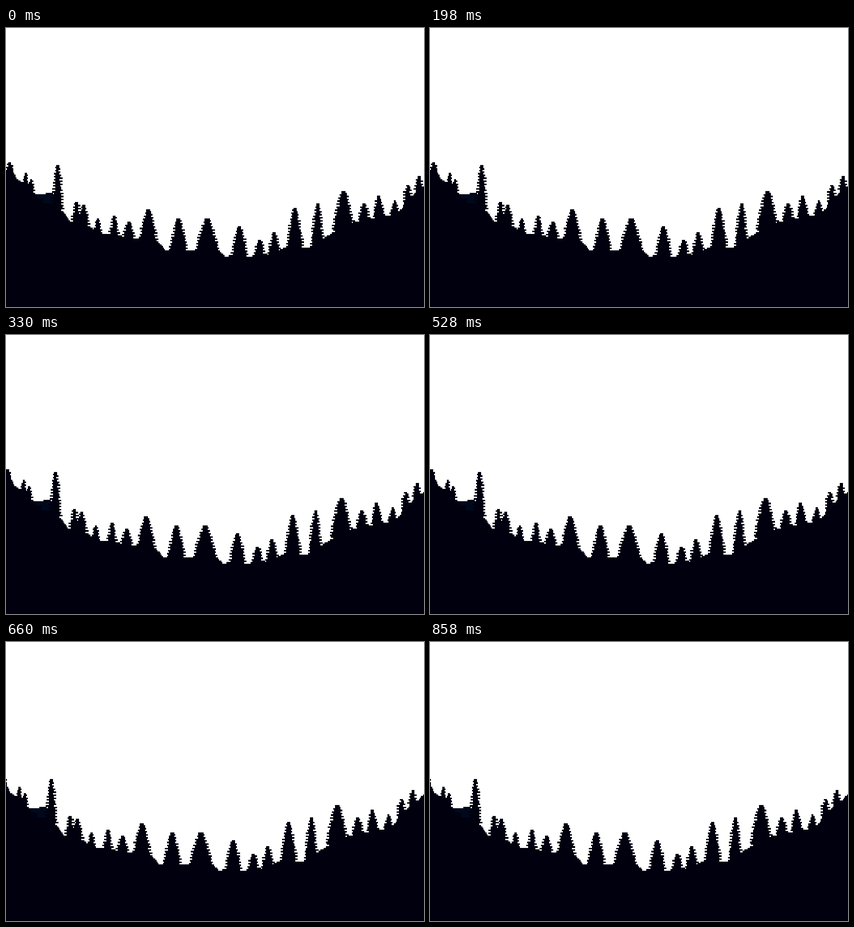
An HTML page with a canvas for the animation above (990 ms loop, 916x611 px).

```html
<!DOCTYPE html>
<html lang="en">
<head>
<meta charset="utf-8">
<title>Forest ridge</title>
<style>
html, body { margin: 0; width: 100%; height: 100%; overflow: hidden; background: #fff; }
canvas { display: block; }
</style>
</head>
<body>
<canvas id="stage" width="916" height="611"></canvas>
<script>
const W = 916, H = 611, ROWS = 183;
const CELL_X = W / 400, CELL_Y = H / ROWS;
const HOLD = 330, SHIFTS = [0, 2, 6];
const NIGHT = '#00000f', NAVY = '#00081c';
const ctx = document.getElementById('stage').getContext('2d');

// Ground between the trees: x, y.
const ridge = [
  [0, 311], [13, 308], [23, 329], [37, 338], [49, 354], [63, 364], [104, 361],
  [107, 385], [127, 404], [143, 426], [187, 437], [209, 450], [294, 461],
  [335, 470], [350, 487], [467, 487], [481, 501], [495, 497], [532, 501],
  [573, 497], [618, 478], [663, 481], [706, 454], [764, 424], [805, 417],
  [843, 409], [867, 397], [873, 384], [895, 364], [900, 350], [918, 348],
  [923, 337], [946, 328]
];

// Centre, top, half width at the base.
const trees = [
  [8, 294, 9], [43, 318, 7], [55, 331, 8], [113, 301, 13], [155, 381, 13],
  [171, 388, 12], [201, 418, 9], [237, 411, 12], [269, 424, 15], [312, 398, 22],
  [378, 418, 22], [441, 418, 28], [512, 434, 19], [556, 464, 15], [588, 448, 15],
  [633, 395, 19], [683, 385, 14], [740, 358, 25], [785, 385, 15], [817, 368, 14],
  [852, 378, 11], [881, 344, 12], [905, 325, 11]
];

// Lighter hillside: x, y, width, height.
const patches = [[68, 364, 35, 10], [82, 372, 21, 12]];

const noise = n => {
  const v = Math.sin(n * 12.9898) * 43758.5453;
  return v - Math.floor(v);
};

function ridgeAt(x) {
  const i = Math.max(1, ridge.findIndex(p => p[0] >= x));
  const [x0, y0] = ridge[i - 1], [x1, y1] = ridge[i];
  return y0 + (y1 - y0) * (x - x0) / (x1 - x0);
}

function cells(col, row, cols, rows, shift) {
  const x0 = Math.round((col - shift) * CELL_X);
  const x1 = Math.round((col + cols - shift) * CELL_X);
  const y0 = Math.round(row * CELL_Y);
  const y1 = Math.round((row + rows) * CELL_Y);
  ctx.fillRect(x0, y0, x1 - x0, y1 - y0);
}

function drawRidge(shift) {
  for (let col = 0; col < 408; col++) {
    const row = Math.round(ridgeAt((col + 0.5) * CELL_X) / CELL_Y);
    cells(col, row, 1, ROWS - row, shift);
  }
}

function drawTree([x, top, wide], shift) {
  const first = Math.round(top / CELL_Y);
  const last = Math.round((ridgeAt(x) + 6) / CELL_Y);
  const tip = 1.5 + wide * 0.14;
  const branch = wide > 11 ? 4 : 2.5;
  for (let row = first; row < last; row++) {
    const t = (row - first) / (last - first);
    const half = tip + (wide - tip) * Math.pow(t, 0.87);
    const reach = side => {
      if (row === first) return tip;
      const tooth = (row + side) % 2 ? 0.55 : -0.55;
      const vary = noise(row * 3 + x + side * 57) - 0.5;
      return Math.max(1.5, half + branch * (tooth + vary * 0.7) * Math.min(1, 0.4 + t * 2));
    };
    const a = Math.round((x - reach(0)) / CELL_X);
    const b = Math.round((x + reach(1)) / CELL_X);
    cells(a, row, Math.max(1, b - a), 1, shift);
  }
}

function draw(shift) {
  ctx.fillStyle = '#fff';
  ctx.fillRect(0, 0, W, H);
  ctx.fillStyle = NIGHT;
  drawRidge(shift);
  ctx.fillStyle = NAVY;
  for (const [x, y, w, h] of patches) {
    cells(Math.round(x / CELL_X), Math.round(y / CELL_Y),
      Math.round(w / CELL_X), Math.round(h / CELL_Y), shift);
  }
  ctx.fillStyle = NIGHT;
  for (const tree of trees) drawTree(tree, shift);
}

const start = performance.now();
let shown = -1;
function tick() {
  const step = Math.floor((performance.now() - start) / HOLD) % SHIFTS.length;
  if (step !== shown) draw(SHIFTS[shown = step]);
  requestAnimationFrame(tick);
}
tick();
</script>
</body>
</html>
```
